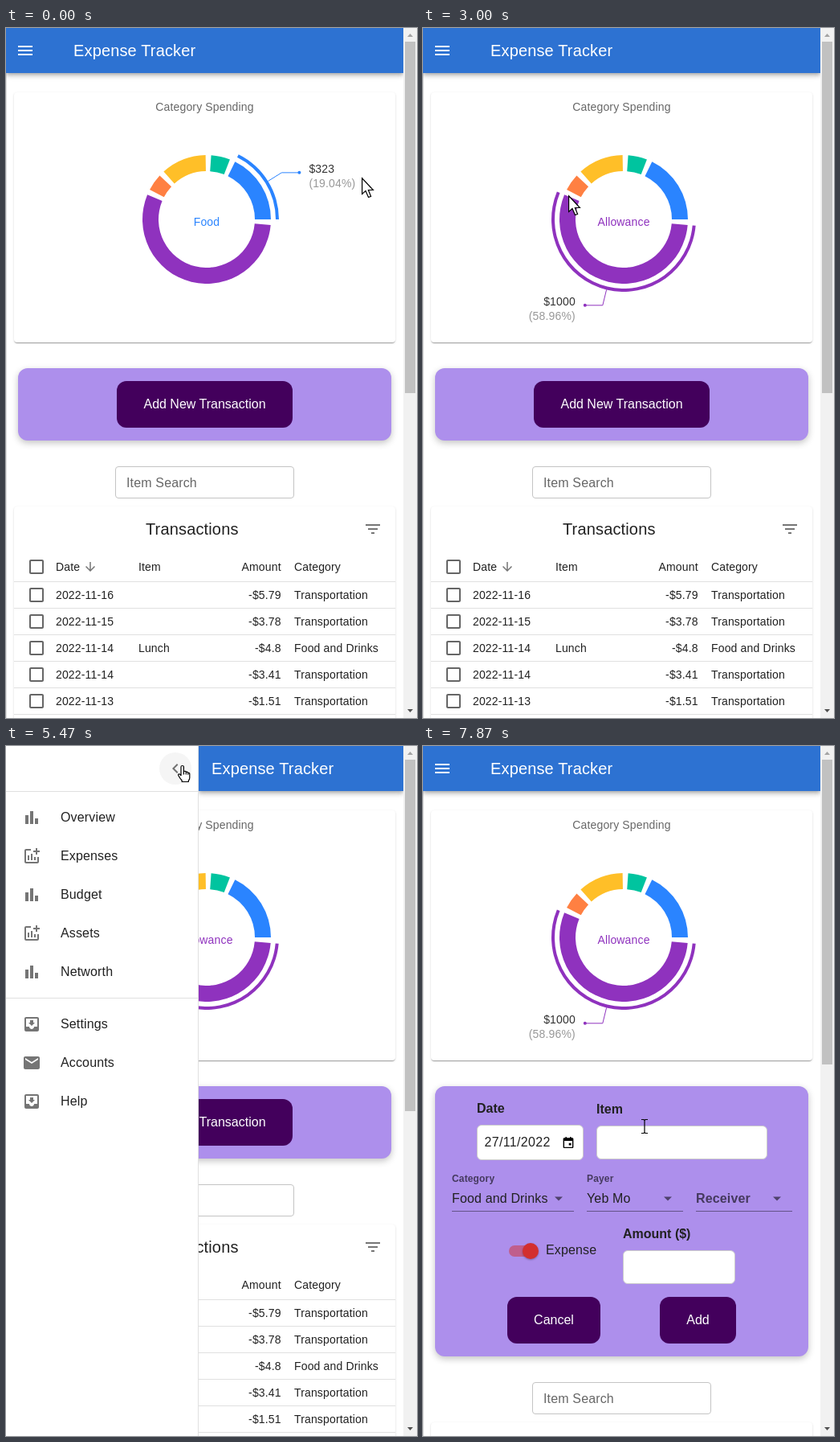
An HTML page for the animation above (8000 ms loop, 512 px wide and 858 px high).

```html
<!DOCTYPE html>
<html lang="en">
<head>
<meta charset="utf-8">
<title>Expense Tracker</title>
<style>
html, body { margin: 0; width: 100%; height: 100%; overflow: hidden; background: #fff; }
#stage { position: absolute; left: 0; top: 0; width: 512px; height: 858px; overflow: hidden; background: #fff; }
.layer, .box, svg { position: absolute; left: 0; top: 0; }
.box { box-sizing: border-box; }
svg { overflow: visible; }
text { font-family: "Liberation Sans", Arial, sans-serif; font-size: 14px; letter-spacing: .15px; fill: #212121; }
.big { font-size: 16px; }
.head { font-size: 20px; }
.plain { letter-spacing: 0; }
.bold { font-weight: bold; }
.white { fill: #fff; }
.soft { fill: rgba(0,0,0,.6); }
.mid { text-anchor: middle; }
.end { text-anchor: end; }
.icon { fill: rgba(0,0,0,.54); }
.card { background: #fff; border-radius: 4px;
  box-shadow: 0 2px 1px -1px rgba(0,0,0,.2), 0 1px 1px rgba(0,0,0,.14), 0 1px 3px rgba(0,0,0,.12); }
.panel { background: #ad8fec; border-radius: 12px; box-shadow: 0 3px 8px rgba(0,0,0,.24); }
.btn { background: #43005c; border-radius: 12px; }
.input { background: #fff; border: 1px solid #ccc; border-radius: 6px; }
.search { border: 1px solid #c4c4c4; border-radius: 4px; }
.line { background: #e0e0e0; }
#bar { height: 56px; background: #2d72d2;
  box-shadow: 0 2px 4px -1px rgba(0,0,0,.2), 0 4px 5px rgba(0,0,0,.14), 0 1px 10px rgba(0,0,0,.12); }
#drawer { width: 240px; height: 858px; background: #fff; }
#cursor path { fill: #fff; stroke: #000; stroke-width: 1.2; }
</style>
</head>
<body>
<div id="stage"></div>
<script>
const stage = document.getElementById('stage');
const $ = id => document.getElementById(id);

const box = (cls, x, y, w, h) =>
  `<div class="box ${cls}" style="left:${x}px;top:${y}px;width:${w}px;height:${h}px"></div>`;
const text = (x, y, str, cls = '', fill = '') =>
  `<text x="${x}" y="${y}" class="${cls}"${fill && ` style="fill:${fill}"`}>${str}</text>`;
const svg = body => `<svg width="512" height="858">${body}</svg>`;
const icon = (name, cx, cy, size = 24, cls = 'icon') =>
  `<path class="${cls}" d="${ICONS[name]}" transform="translate(${cx - size / 2} ${cy - size / 2}) scale(${size / 24})"/>`;
function layer(id, boxes, marks) {
  stage.insertAdjacentHTML('beforeend', `<div class="layer" id="${id}">${boxes}${svg(marks)}</div>`);
}

const ICONS = {
  menu: 'M3 18h18v-2H3zM3 13h18v-2H3zM3 6v2h18V6z',
  filter: 'M10 18h4v-2h-4zM3 6v2h18V6zM6 13h12v-2H6z',
  down: 'M20 12l-1.41-1.41L13 16.17V4h-2v12.17l-5.58-5.59L4 12l8 8z',
  check: 'M19 5v14H5V5h14m0-2H5c-1.1 0-2 .9-2 2v14c0 1.1.9 2 2 2h14c1.1 0 2-.9 2-2V5c0-1.1-.9-2-2-2z',
  drop: 'M7 10l5 5 5-5z',
  back: 'M15.41 7.41L14 6l-6 6 6 6 1.41-1.41L10.83 12z',
  bars: 'M4 9h4v11H4zM16 13h4v7h-4zM10 4h4v16h-4z',
  chart: 'M22 5v2h-3v3h-2V7h-3V5h3V2h2v3zM19 19H5V5h6V3H5c-1.1 0-2 .9-2 2v14c0 1.1.9 2 2 2h14c1.1 0 2-.9 2-2v-6h-2zM15 13v4h2v-4zM11 17h2V9h-2zM9 17v-6H7v6z',
  inbox: 'M19 3H5c-1.1 0-2 .9-2 2v14c0 1.1.9 2 2 2h14c1.1 0 2-.9 2-2V5c0-1.1-.9-2-2-2zm0 12h-4c0 1.66-1.35 3-3 3s-3-1.34-3-3H5V5h14zm-3-5h-2V7h-4v3H8l4 4z',
  mail: 'M20 4H4c-1.1 0-2 .9-2 2v12c0 1.1.9 2 2 2h16c1.1 0 2-.9 2-2V6c0-1.1-.9-2-2-2zm0 4l-8 5-8-5V6l8 5 8-5z',
  date: 'M19 4h-2V2h-2v2H9V2H7v2H5c-1.1 0-2 .9-2 2v14c0 1.1.9 2 2 2h14c1.1 0 2-.9 2-2V6c0-1.1-.9-2-2-2zm0 16H5V9h14zM13 13h4v4h-4z'
};

// Donut: each slice shares 335 degrees, with 5 degrees of padding between slices.
const CX = 250, CY = 238, PAD = 5;
const SLICES = [
  ['Food', 323, '#2a84ff'], ['Transport', 87, '#00c49f'], ['Shopping', 208, '#ffbf28'],
  ['Health', 78, '#ff8042'], ['Allowance', 1000, '#8f32be']
];
const total = SLICES.reduce((sum, s) => sum + s[1], 0);
const polar = (r, deg) => {
  const a = deg * Math.PI / 180;
  return [CX + r * Math.cos(a), CY - r * Math.sin(a)];
};
function sector(r0, r1, a0, a1, color) {
  const big = a1 - a0 > 180 ? 1 : 0;
  return `<path fill="${color}" d="M${polar(r1, a0)}A${r1} ${r1} 0 ${big} 0 ${polar(r1, a1)}` +
    `L${polar(r0, a1)}A${r0} ${r0} 0 ${big} 1 ${polar(r0, a0)}Z"/>`;
}
let angle = 0, ring = '', callouts = '';
SLICES.forEach(([name, value, color], i) => {
  const end = angle + value / total * (360 - PAD * SLICES.length);
  const mid = (angle + end) / 2, [mx, my] = polar(110, mid);
  const side = mx >= CX ? 1 : -1, ex = mx + 22 * side, anchor = side < 0 ? 'end' : '';
  ring += sector(60, 80, angle, end, color);
  callouts += `<g id="slice${i}">` + sector(86, 90, angle, end, color) +
    `<path d="M${polar(90, mid)}L${mx} ${my}H${ex}" fill="none" stroke="${color}"/>` +
    `<circle cx="${ex}" cy="${my}" r="2" fill="${color}"/>` +
    text(CX, CY + 8, name, 'mid', color) +
    text(ex + 12 * side, my, '$' + value, anchor, '#333') +
    text(ex + 12 * side, my + 18, `(${(value / total * 100).toFixed(2)}%)`, anchor, '#999') + '</g>';
  angle = end + PAD;
});

layer('top', box('line', 0, 56, 1, 802) + box('card', 10, 80, 475, 311),
  text(247.5, 103, 'Category Spending', 'mid soft') + ring + callouts);

layer('adder', box('panel', 15, 423, 465, 90) + box('btn', 138, 439, 219, 58),
  text(247.5, 473, 'Add New Transaction', 'big plain mid white'));

const select = (x, w) => icon('drop', x + w - 19, 562.5) +
  `<rect x="${x}" y="578" width="${w}" height="1" fill="rgba(0,0,0,.42)"/>`;
const label = (x, str) => text(x, 542, str, 'bold soft').replace('<text', '<text style="font-size:12px"');
layer('form',
  box('panel', 15, 423, 465, 336) + box('input', 67, 471, 133, 44) + box('input', 216, 472, 213, 42) +
  box('input', 249, 627, 140, 42) + box('btn', 105, 685, 116, 58) + box('btn', 295, 685, 95, 58),
  text(67, 456, 'Date', 'big bold plain') + text(216, 457, 'Item', 'big bold plain') +
  text(76.5, 498, '27/11/2022', 'big').replace('<text', '<text style="letter-spacing:.33px"') +
  icon('date', 181, 493, 17, '') +
  label(36, 'Category') + label(204, 'Payer') +
  text(36, 568, 'Food and Drinks', 'big') + text(204, 568, 'Yeb Mo', 'big') +
  text(340, 568, 'Receiver', 'big bold soft') +
  select(36, 152) + select(204, 120) + select(340, 120) +
  '<rect x="107" y="621" width="34" height="14" rx="7" fill="#d32f2f" opacity=".5"/>' +
  '<circle cx="134" cy="628" r="10" fill="#d32f2f" style="filter:drop-shadow(0 1px 1px rgba(0,0,0,.3))"/>' +
  text(153, 632, 'Expense', 'big') + text(249, 612, 'Amount ($)', 'big bold plain') +
  text(163, 719, 'Cancel', 'big plain mid white') + text(342.5, 719, 'Add', 'big plain mid white'));

const ROWS = [
  ['16', '', '5.79'], ['15', '', '3.78'], ['14', 'Lunch', '4.8', 'Food and Drinks'],
  ['14', '', '3.41'], ['13', '', '1.51']
];
const row = (y, date, item, amount, category) =>
  icon('check', 38, y, 24, 'soft') + text(62, y + 5, date) + text(165, y + 5, item) +
  text(342.7, y + 5, amount, 'end') + text(359, y + 5, category);
layer('lower',
  box('search', 136, 545, 223, 40) + box('card', 10, 595, 475, 300) +
  [0, 1, 2, 3, 4, 5].map(i => box('line', 10, 688 + 33 * i, 475, 1)).join(''),
  text(150, 571, 'Item Search', 'big soft') + text(174, 630, 'Transactions', 'head') +
  icon('filter', 457, 623) + row(670, 'Date', 'Item', 'Amount', 'Category') + icon('down', 105, 670, 18) +
  ROWS.map(([day, item, sum, cat = 'Transportation'], i) =>
    row(705 + 33 * i, '2022-11-' + day, item, '-$' + sum, cat)).join(''));

layer('bar', '',
  '<g id="menu"><circle id="menuHover" cx="24" cy="28" r="20" fill="rgba(0,0,0,.05)"/>' +
  icon('menu', 24, 28, 24, 'white') + '</g>' + text(0, 35, 'Expense Tracker', 'head white'));
const title = document.querySelector('#bar text');

const NAV = [
  ['Overview', 'bars'], ['Expenses', 'chart'], ['Budget', 'bars'], ['Assets', 'chart'], ['Networth', 'bars'],
  ['Settings', 'inbox'], ['Accounts', 'mail'], ['Help', 'inbox']
];
layer('drawer',
  box('line', 239, 0, 1, 858) + box('line', 0, 56, 240, 1) + box('line', 0, 313, 240, 1),
  '<circle id="backHover" cx="211" cy="28" r="20" fill="#f5f5f5"/>' + icon('back', 211, 28) +
  NAV.map(([name, pic], i) => {
    const y = 89 + 48 * i + (i > 4 ? 17 : 0);
    return icon(pic, 32, y) + text(68, y + 5, name, 'big');
  }).join(''));

layer('scroll', '',
  '<rect x="495" width="17" height="858" fill="#f1f1f1"/><rect id="thumb" x="497" y="17" width="13"/>' +
  '<path d="M500 11h7l-3.5-4z" fill="#a3a3a3"/><path d="M500 847h7l-3.5 4z" fill="#505050"/>');

layer('cursor', '',
  '<path id="arrow" d="M.6 .8V20.5L5 16.5L8.5 24.6L11.6 23.4L8.4 15.5H14.4Z"/>' +
  '<g id="hand"><path d="M-2 13V2Q-2 .5 -.3 .5T1.4 2V7.5Q3.9 6.8 4.3 8.3Q6.4 7.8 6.8 9.3Q8.8 9 8.8 11V15.5' +
  'Q8.8 17.5 7.3 19V20.5H-.8V19Q-3.5 16 -5.3 12.5Q-5.8 10.7 -4 10.8Q-3 11 -2 13Z"/>' +
  '<path d="M1.4 7.5v4M4.3 8.3v3.2M6.8 9.3v2.4"/></g>' +
  '<path id="beam" style="fill:none" d="M-4 -8.5h3l1 1 1-1h3M0 -7.5V7.5M-4 8.5h3l1-1 1 1h3"/>');

// Pointer path: time, x, y
const PATH = [
  [0, 443, 186], [330, 481, 254], [600, 481, 254], [930, 497, 250], [1000, 497, 250], [1330, 342, 183],
  [1600, 274, 170], [1870, 262, 167], [2200, 222, 172], [2400, 222, 172], [2670, 207, 200], [2800, 186, 222],
  [3000, 181, 208], [3330, 181, 208], [3470, 190, 222], [3600, 181, 241], [3730, 181, 241], [4400, 30, 30],
  [4530, 28, 25], [5070, 28, 25], [5470, 220, 24], [6270, 220, 24], [6600, 270, 200], [6870, 291, 434],
  [6930, 281, 465], [7070, 276, 472], [8000, 276, 473]
];
function pointer(t) {
  const i = Math.max(1, PATH.findIndex(p => p[0] >= t));
  const [t0, x0, y0] = PATH[i - 1], [t1, x1, y1] = PATH[i], k = (t - t0) / (t1 - t0);
  return [Math.round(x0 + (x1 - x0) * k), Math.round(y0 + (y1 - y0) * k)];
}

function bezier(x1, y1, x2, y2, x) {
  if (x <= 0 || x >= 1) return x <= 0 ? 0 : 1;
  const at = (a, b, u) => 3 * a * u * (1 - u) ** 2 + 3 * b * u * u * (1 - u) + u ** 3;
  let lo = 0, hi = 1;
  for (let i = 0; i < 24; i++) {
    const u = (lo + hi) / 2;
    if (at(x1, x2, u) < x) lo = u; else hi = u;
  }
  return at(y1, y2, lo);
}

const show = (id, on) => { $(id).style.display = on ? '' : 'none'; };
const inside = (x, y, l, t, r, b) => x >= l && x <= r && y >= t && y <= b;

function draw(t) {
  const open = t >= 4650 && t < 6093, form = t >= 7800;
  const out = bezier(0, 0, .2, 1, (t - 4650) / 225) - bezier(.4, 0, .6, 1, (t - 6093) / 195);
  const [x, y] = pointer(t);

  const active = t < 1670 ? 0 : t < 2000 ? 1 : t < 2800 ? 2 : 4;
  SLICES.forEach((_, i) => show('slice' + i, i === active));

  show('adder', !form);
  show('form', form);
  $('lower').style.transform = form ? 'translateY(246px)' : '';

  const left = 240 * out;
  $('bar').style.left = left + 'px';
  $('bar').style.width = 495 - left + 'px';
  title.setAttribute('x', open ? 16 : 84);
  show('menu', !open);
  show('drawer', out > 0);
  $('drawer').style.transform = `translateX(${left - 240}px)`;

  const onMenu = !open && inside(x, y, 4, 8, 44, 48);
  const onBack = out > .5 && inside(x, y, 191, 8, 231, 48);
  const onAdd = inside(x, y, 138, 439, 357, 497);
  const beam = t >= 7870, hand = !beam && (onMenu || onBack || onAdd);
  show('menuHover', onMenu);
  show('backHover', onBack);

  $('thumb').setAttribute('height', form ? 379 : 437);
  $('thumb').setAttribute('fill', x >= 495 ? '#a8a8a8' : '#c1c1c1');

  show('beam', beam);
  show('hand', hand);
  show('arrow', !beam && !hand);
  $('cursor').style.transform = `translate(${x}px,${y}px)`;
}

function tick() {
  const step = Math.floor((performance.now() % 8000 + 3.4) * 3 / 200);
  draw(Math.min(7990, 10 * Math.round(step * 20 / 3)));
  requestAnimationFrame(tick);
}
tick();
</script>
</body>
</html>
```
